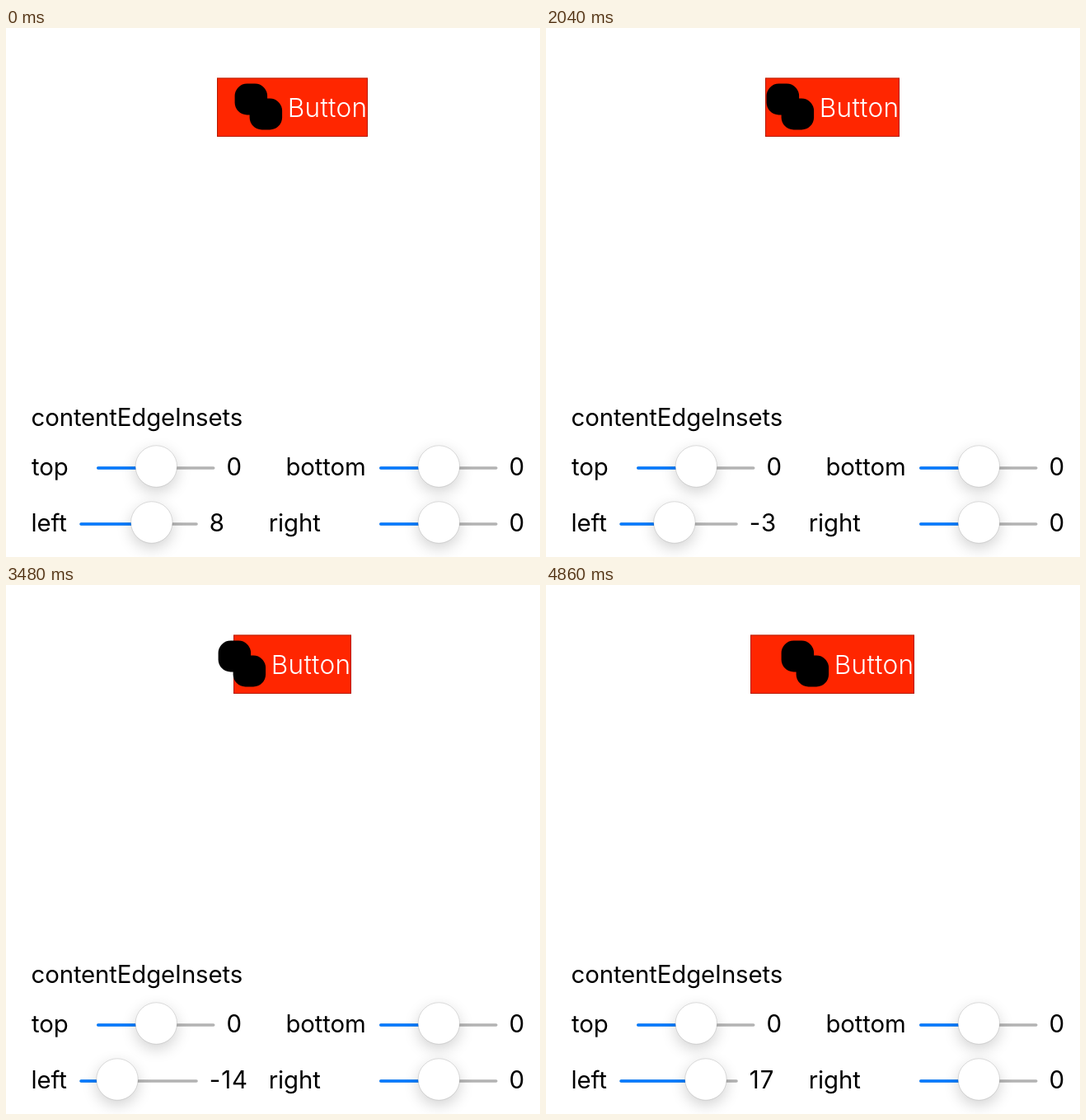
An HTML page with a canvas that plays this animation: 648 by 642 pixels, repeating every 4920 ms.

```html
<!DOCTYPE html>
<html lang="en">
<head>
<meta charset="utf-8">
<title>contentEdgeInsets</title>
<style>
  html, body { margin: 0; width: 100%; height: 100%; overflow: hidden; background: #fff; }
  canvas { display: block; }
</style>
</head>
<body>
<canvas id="stage" width="648" height="642"></canvas>
<script>
const ctx = document.getElementById('stage').getContext('2d');
const LOOP = 4920;
const STEP = 60;
const FONT = 'Inter, "Open Sans", sans-serif';

// Turning points of the left inset: [ms, value]
const insetPath = [[0, 7.9], [770, 25], [3010, -25], [4860, 17.1]];

function insetAt(ms) {
  let i = 1;
  while (i < insetPath.length - 1 && ms > insetPath[i][0]) i++;
  const [t0, v0] = insetPath[i - 1];
  const [t1, v1] = insetPath[i];
  return Math.round(v0 + (v1 - v0) * (ms - t0) / (t1 - t0));
}

function text(str, x, y, { size = 29.4, weight = 400, color = '#000', spacing = -0.13 } = {}) {
  ctx.font = `${weight} ${size}px ${FONT}`;
  ctx.letterSpacing = `${spacing}px`;
  ctx.fillStyle = color;
  ctx.fillText(str, x, y);
}

function roundRect(x, y, w, h, r, color) {
  ctx.fillStyle = color;
  ctx.beginPath();
  ctx.roundRect(x, y, w, h, r);
  ctx.fill();
}

function drawThumb(x, y) {
  ctx.save();
  ctx.shadowColor = 'rgba(0,0,0,0.18)';
  ctx.shadowBlur = 18;
  ctx.shadowOffsetY = 6;
  ctx.fillStyle = '#fff';
  ctx.beginPath();
  ctx.arc(x, y, 25.2, 0, Math.PI * 2);
  ctx.fill();
  ctx.restore();
  ctx.strokeStyle = 'rgba(0,0,0,0.13)';
  ctx.lineWidth = 1;
  ctx.stroke();
}

function drawSlider(x, y, value) {
  const thumbX = x + 72.3 + value * 1.9;
  roundRect(x, y - 1.8, 143.5, 3.6, 1.8, '#b3b3b3');
  roundRect(x, y - 1.8, thumbX - x, 3.6, 1.8, '#007aff');
  drawThumb(thumbX, y - 2);
}

function drawControl(label, labelX, trackX, y, value) {
  const baseline = y + 9;
  text(label, labelX, baseline);
  drawSlider(trackX, y, value);
  text(String(value), trackX + 157.5, baseline, { spacing: 0.9 });
}

function drawButton(inset) {
  const grow = inset * 0.895;
  const left = Math.round(263.4 - grow);
  const right = Math.round(431.6 + grow);
  ctx.fillStyle = '#ff2600';
  ctx.fillRect(left, 60.5, right - left, 71.5);
  ctx.strokeStyle = 'rgba(110,15,0,0.5)';
  ctx.lineWidth = 1;
  ctx.strokeRect(left + 0.5, 61, right - left - 1, 70.5);
  roundRect(right - 161.4, 67.5, 39.5, 38, 15, '#000');
  roundRect(right - 143.4, 85.5, 39.5, 38, 15, '#000');
  text('Button', right - 97.2, 108, { size: 31.6, weight: 300, color: '#fff', spacing: 0.25 });
}

function draw(ms) {
  const inset = insetAt(Math.floor(ms / STEP) * STEP);
  ctx.fillStyle = '#fff';
  ctx.fillRect(0, 0, 648, 642);
  drawButton(inset);
  text('contentEdgeInsets', 30.5, 483);
  drawControl('top', 31, 110, 534, 0);
  drawControl('bottom', 339.5, 453, 534, 0);
  drawControl('left', 30.5, 89.3, 602, inset);
  drawControl('right', 318.8, 453, 602, 0);
}

const start = performance.now();
function tick() {
  draw((performance.now() - start) % LOOP);
  requestAnimationFrame(tick);
}
tick();
</script>
</body>
</html>
```
